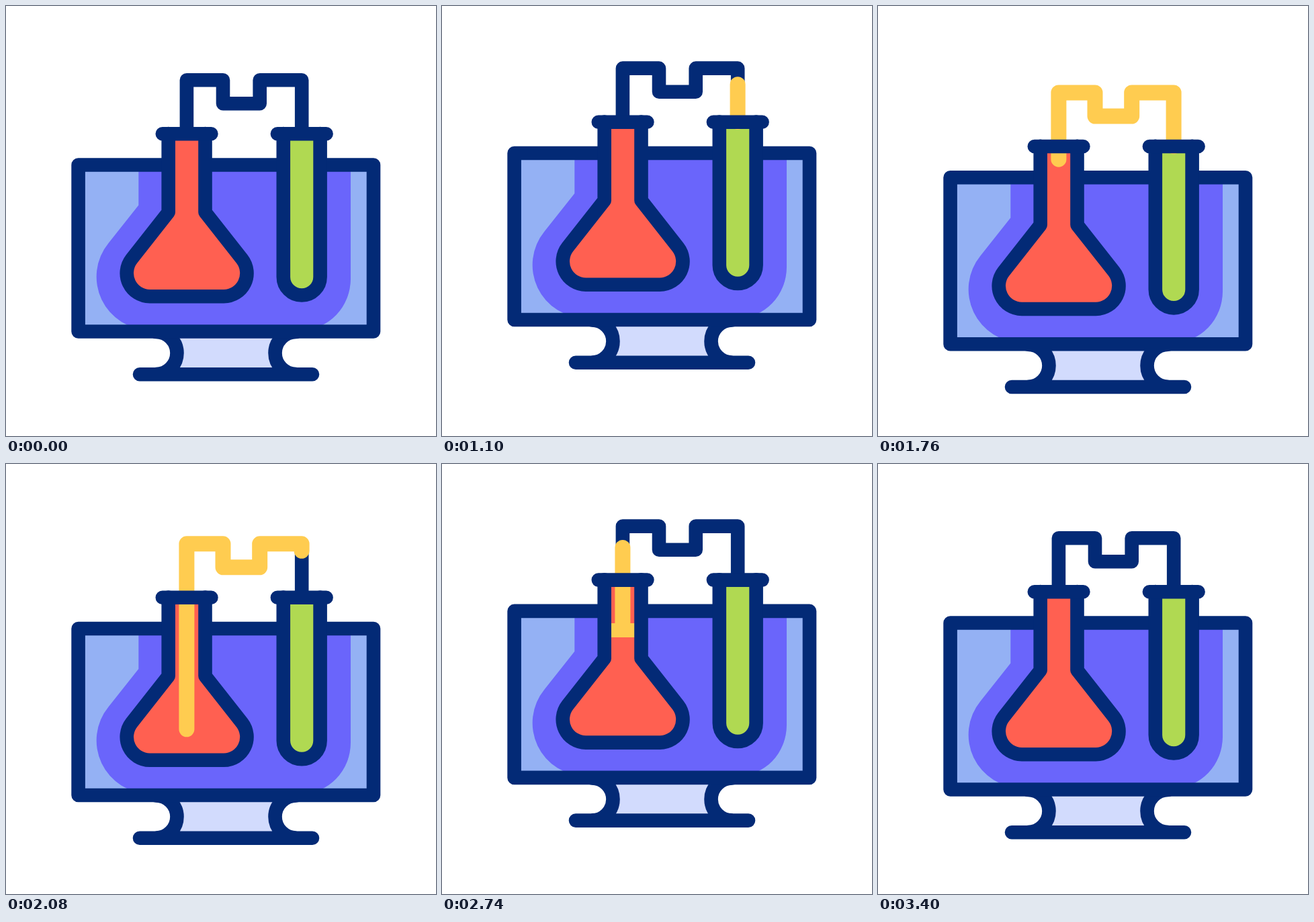
Animation of 640x640 px, one loop 3.62 s. Source, as an HTML page:

```html
<!DOCTYPE html>
<html lang="en">
<head>
<meta charset="utf-8">
<title>Online chemistry lab</title>
<style>
  html, body { margin: 0; width: 100%; height: 100%; overflow: hidden; background: #fff; }
  svg { display: block; width: 100vw; height: 100vh; }
  .ink { fill: none; stroke: #032a76; stroke-width: 20.6; stroke-linecap: round; stroke-linejoin: round; }
  .glow { fill: #ffcc50; }
  #flow { fill: none; stroke: #ffcc50; stroke-width: 23; stroke-linecap: round; stroke-linejoin: round; }
</style>
</head>
<body>
<svg viewBox="0 0 640 640">
  <defs>
    <path id="flask" d="M241.7 190V307L187 376.5A34.5 34.5 0 0 0 214 432.2H324.2A34.5 34.5 0 0 0 351.2 376.5L296.5 307V190"/>
    <path id="tube" d="M412.8 190V403.2A27.4 27.4 0 0 0 467.6 403.2V190"/>
    <clipPath id="inFlask"><use href="#flask"/></clipPath>
    <clipPath id="inTube"><use href="#tube"/></clipPath>
    <clipPath id="inScreen"><rect x="107.5" y="236.5" width="439.5" height="248"/></clipPath>
  </defs>
  <g id="scene">
    <!-- stand -->
    <path fill="#d2dbfd" d="M223 485A31.5 31.5 0 0 1 223 548H432A31.5 31.5 0 0 1 432 485Z"/>
    <path class="ink" d="M223 485A31.5 31.5 0 0 1 223 548M432 485A31.5 31.5 0 0 0 432 548M199 548.2H456"/>
    <!-- screen -->
    <rect x="107.5" y="236.5" width="439.5" height="248" fill="#94b1f4"/>
    <path clip-path="url(#inScreen)" fill="#6a65fb"
      d="M197.3 230V296.5L152.5 353A79 79 0 0 0 214 482H440A73 76 0 0 0 513 406V230Z"/>
    <rect class="ink" x="107.6" y="236.5" width="439.4" height="248"/>
    <!-- glassware and pipe -->
    <path class="ink" d="M268.9 190V110.2H323V145.3H377.7V110.2H440.2V190"/>
    <use href="#flask" fill="#ff6051"/>
    <use href="#tube" fill="#b0d952"/>
    <g clip-path="url(#inTube)"><rect id="tubeBand" class="glow" x="400" width="80" height="21"/></g>
    <g clip-path="url(#inFlask)"><rect id="flaskBand" class="glow" x="160" width="220" height="21"/></g>
    <path id="flow" d="M440.1 190V110.2H377.7V145.3H323V110.2H268.9V432"/>
    <use href="#flask" class="ink"/>
    <use href="#tube" class="ink"/>
    <path class="ink" d="M232.8 190.2H305.4M403.9 190.2H476.6"/>
  </g>
</svg>
<script>
const LOOP = 3620, START = 200, BEAT = 800;
const HEIGHTS = [0, -19, 19, -19, 0];
const FLOW_BOTTOM = 432;

const $ = id => document.getElementById(id);
const scene = $('scene'), flow = $('flow'), tubeBand = $('tubeBand'), flaskBand = $('flaskBand');
const flowLength = flow.getTotalLength();

const clamp = (v, lo, hi) => Math.min(hi, Math.max(lo, v));
const sineEase = p => (1 - Math.cos(Math.PI * p)) / 2;

function bob(t) {
  const beats = clamp((t - START) / BEAT, 0, HEIGHTS.length - 1);
  const i = Math.min(Math.floor(beats), HEIGHTS.length - 2);
  return HEIGHTS[i] + (HEIGHTS[i + 1] - HEIGHTS[i]) * sineEase(beats - i);
}

// Moves a band of liquid up its vessel and returns its centre.
function raise(band, t, from, to, bottom, top) {
  const p = clamp((t - from) / (to - from), 0, 1);
  const y = bottom + (top - bottom) * p;
  band.setAttribute('y', y - 10.5);
  band.style.display = p > 0 && p < 1 ? '' : 'none';
  return y;
}

function render(t) {
  scene.setAttribute('transform', `translate(0 ${bob(t).toFixed(3)})`);
  raise(tubeBand, t, 200, 1000, 432, 190);
  const surface = raise(flaskBand, t, 2180, 3000, 432, 188);

  // The stream stops at the rising surface in the flask.
  const limit = flowLength - (FLOW_BOTTOM - surface) - 4;
  const head = Math.min((t - 1000) * 0.5525, limit);
  const tail = Math.max(0, (t - 1920) * 0.43);
  const visible = head > tail;
  flow.style.display = visible ? '' : 'none';
  if (visible) {
    flow.setAttribute('stroke-dasharray', `${head - tail} 9999`);
    flow.setAttribute('stroke-dashoffset', -tail);
  }
}

const origin = performance.now();
function tick() {
  render((performance.now() - origin) % LOOP);
  requestAnimationFrame(tick);
}
tick();
</script>
</body>
</html>
```
